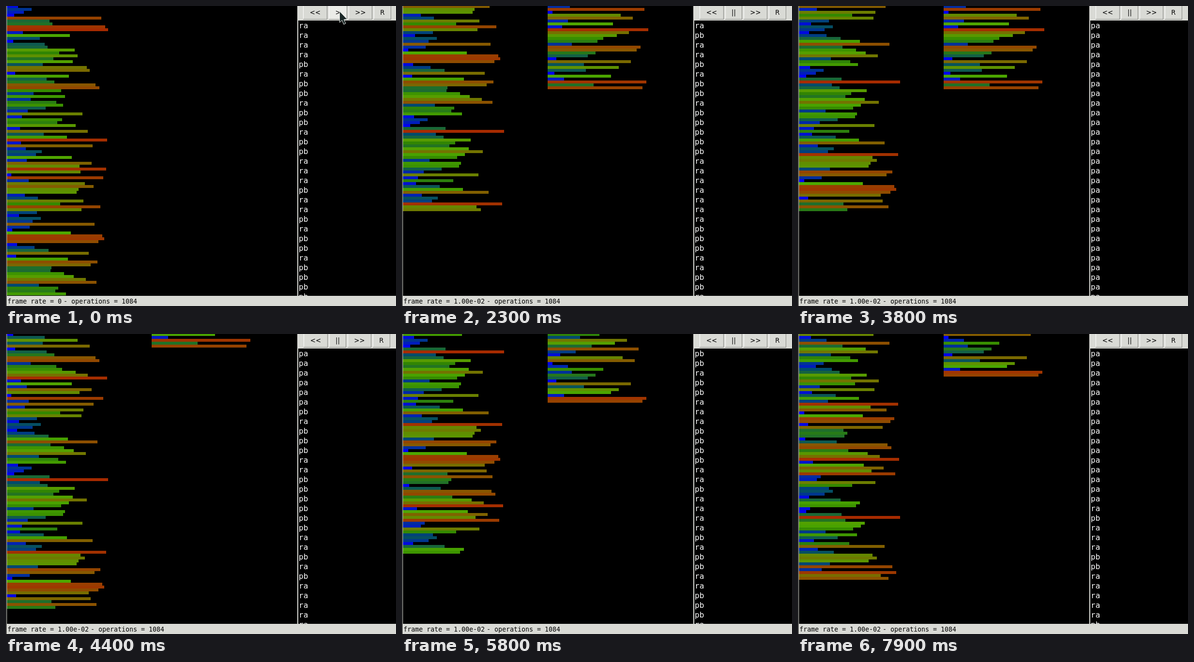
Animation, 806 px wide and 620 px high, one loop 8000 ms. Source, as an HTML page with a canvas:

```html
<!DOCTYPE html>
<html lang="en">
<head>
<meta charset="utf-8">
<title>Two-stack radix sort</title>
<style>
html, body { margin: 0; width: 100%; height: 100%; overflow: hidden; background: #000; }
canvas { display: block; }
</style>
</head>
<body>
<canvas id="stage" width="806" height="620"></canvas>
<script>
const ctx = document.getElementById('stage').getContext('2d');
const LOOP = 8000, STEP = 100, PRESS = 500, START = 800;
const PANEL = '#d9dad5';
const MONO = '"DejaVu Sans Mono", monospace';
const SANS = '"DejaVu Sans", sans-serif';

// Ranks in their unsorted order.
const ranks = [
  7, 21, 13, 3, 92, 39, 42, 96, 99, 12, 60, 29, 2, 34, 37, 65, 49, 68, 43, 63,
  32, 77, 80, 4, 59, 36, 44, 86, 90, 51, 23, 55, 20, 46, 53, 35, 17, 73, 11, 52,
  47, 66, 9, 78, 33, 57, 98, 10, 83, 15, 31, 25, 62, 16, 82, 70, 97, 71, 0, 94,
  18, 75, 84, 69, 67, 14, 27, 74, 50, 91, 72, 26, 8, 30, 22, 85, 19, 1, 61, 93,
  95, 89, 6, 24, 38, 79, 5, 58, 88, 81, 41, 40, 54, 64, 76, 87, 28, 48, 45, 56
];

// Operations finished at a given time: [ms, count].
const pace = [[800, 2], [1500, 30], [3200, 97], [4400, 145], [5800, 199], [6700, 237], [7900, 285]];

const moves = {
  ra: (a, b) => a.push(a.shift()),
  pb: (a, b) => b.unshift(a.shift()),
  pa: (a, b) => a.unshift(b.shift())
};

function radixOps() {
  const a = ranks.slice(), b = [], ops = [];
  const run = op => { moves[op](a, b); ops.push(op); };
  for (let bit = 0; bit < 7; bit++) {
    for (let i = 0; i < ranks.length; i++) run(a[0] >> bit & 1 ? 'ra' : 'pb');
    while (b.length) run('pa');
  }
  return ops;
}
const ops = radixOps();

function opsDone(t) {
  if (t < START) return 0;
  let k = 1;
  while (k < pace.length - 1 && t > pace[k][0]) k++;
  const [t0, n0] = pace[k - 1], [t1, n1] = pace[k];
  return Math.round(n0 + (n1 - n0) * (t - t0) / (t1 - t0));
}

function color(v) {
  const r = Math.max(0, 2.35 * (v - 28));
  const g = v <= 61 ? Math.max(0, 2.9 * (v - 3)) : 168 - 3.3 * (v - 61);
  const b = Math.max(0, 255 * (1 - v / 49.5));
  return `rgb(${Math.round(r)},${Math.round(g)},${Math.round(b)})`;
}

function rect(x, y, w, h, fill) {
  ctx.fillStyle = fill;
  ctx.fillRect(x, y, w, h);
}

function text(str, x, y, font, fill, align = 'left') {
  ctx.font = font;
  ctx.fillStyle = fill;
  ctx.textAlign = align;
  ctx.fillText(str, x, y);
}

function drawStack(stack, left, origin) {
  stack.forEach((v, i) => {
    const right = origin + 11 + Math.round(v * 200 / 99);
    rect(left, 6 * i - 2, right - left, 6, color(v));
  });
}

function drawList(first) {
  ctx.save();
  ctx.beginPath();
  ctx.rect(604, 30, 202, 569);
  ctx.clip();
  for (let i = 0; i < 29; i++) {
    text(ops[first + i], 605, 46 + 20 * i, '16px ' + MONO, '#fff');
  }
  ctx.restore();
}

function button(label, x0, x1, hover, pressed) {
  const w = x1 - x0, edge = '#858683';
  rect(x0, 0, w, 28, hover ? '#ebece8' : PANEL);
  rect(x0, 0, 1, 28, pressed ? edge : '#fff');
  rect(x1 - 1, 0, 1, 28, pressed ? '#fff' : edge);
  rect(x0, 27, w, 1, pressed ? '#fff' : edge);
  const d = pressed ? 1 : 0;
  text(label, (x0 + x1) / 2 + d, 18 + d, '13.33px ' + SANS, '#000', 'center');
}

function drawCursor() {
  const pts = [[689.5, 11], [689.5, 34], [694.5, 29.5], [698, 38], [702, 36], [698.5, 28], [705, 27.5]];
  ctx.beginPath();
  pts.forEach(([x, y]) => ctx.lineTo(x, y));
  ctx.closePath();
  ctx.fillStyle = '#1b2827';
  ctx.fill();
  ctx.strokeStyle = '#e8ebe8';
  ctx.lineWidth = 1;
  ctx.stroke();
}

function drawBar(t) {
  rect(604, 0, 202, 30, PANEL);
  if (t < START) {
    button('<<', 614, 664);
    button('>', 667, 705, true, t >= PRESS);
    button('>>', 708, 757);
    button('R', 760, 796);
    drawCursor();
  } else {
    button('<<', 615, 665);
    button('||', 668, 703);
    button('>>', 706, 755);
    button('R', 758, 794);
  }
}

function drawStatus(t) {
  const rate = 'frame rate = ' + (t < START ? '0' : '1.00e-02');
  const font = '13.3px ' + MONO;
  rect(1, 599, 805, 21, PANEL);
  text(rate, 3, 615, font, '#000');
  text('- operations = ' + ops.length, 7 + 8 * rate.length, 615, font, '#000');
}

function draw(t) {
  const n = opsDone(t), a = ranks.slice(), b = [];
  for (let i = 0; i < n; i++) moves[ops[i]](a, b);
  rect(0, 0, 806, 620, '#000');
  rect(1, 0, 1, 599, PANEL);
  drawStack(a, 2, 0);
  drawStack(b, 301, 300);
  rect(602, 0, 2, 599, PANEL);
  drawList(Math.max(0, n - 1));
  drawBar(t);
  drawStatus(t);
}

let shown = -1;
function tick() {
  const t = Math.floor(performance.now() % LOOP / STEP) * STEP;
  if (t !== shown) draw(shown = t);
  requestAnimationFrame(tick);
}
tick();
</script>
</body>
</html>
```
